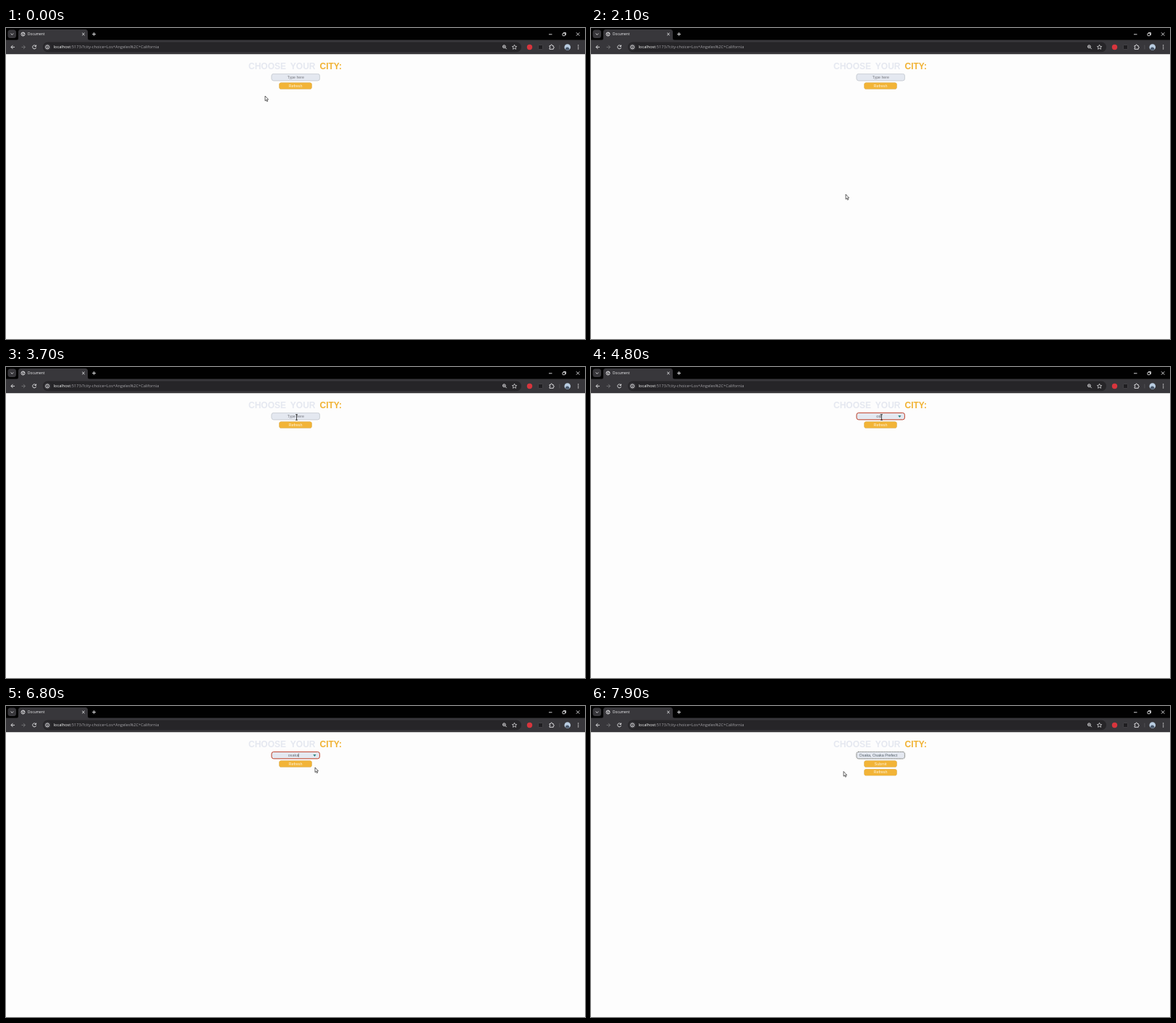
Write an HTML page that moves like this. It is 800 by 430 pixels and loops after 8000 ms.

```html
<!DOCTYPE html>
<html lang="en">
<head>
<meta charset="utf-8">
<title>City picker</title>
<style>
  html, body { margin: 0; width: 100%; height: 100%; overflow: hidden; background: #fdfdfd; }
  svg { display: block; width: 100vw; height: 100vh; }
  text { font-family: "Liberation Sans", Arial, sans-serif; font-size: 5.4px; white-space: pre; }
  .ui { font-family: "Open Sans", "Noto Sans", sans-serif; }
  .line { fill: none; stroke: #e8e8ea; stroke-width: .9; }
  .mid { text-anchor: middle; }
  .button rect { fill: #f2b437; filter: drop-shadow(0 .5px .6px #0004); }
  .button text { fill: #fff3d8; }
</style>
</head>
<body>
<svg viewBox="0 0 800 430" preserveAspectRatio="none">
  <rect width="800" height="430" fill="#fdfdfd"/>

  <!-- Browser chrome -->
  <rect width="800" height="18" fill="#010101"/>
  <rect y="16.5" width="800" height="19.7" fill="#38373b"/>
  <path d="M14 17q3 0 3-3V5.5q0-3.5 3.500-3.500H109.500q3.500 0 3.500 3.500V14q0 3 3 3Z" fill="#38373b"/>
  <rect x="2.500" y="2.500" width="11.500" height="11.500" rx="3.500" fill="#38373b"/>
  <path class="line" d="M6.600 7.600l1.800 1.800 1.800-1.800"/>
  <circle class="line" cx="23.500" cy="8.500" r="2.500" stroke-width=".8"/>
  <path class="line" d="M21.500 7.500l2 1 .3 2M23.500 6l1 1.500 1.500.2"/>
  <text class="ui" x="30" y="10.400" style="font-size:4.800px" fill="#f0f0f2">Document</text>
  <path class="line" d="M105.200 6.800l3.400 3.400m0-3.400l-3.400 3.400M121.600 6v5M119.100 8.500h5"/>
  <path class="line" d="M750 8.800h4.500M788 6.300l4.400 4.400m0-4.400l-4.400 4.400M770.200 6.500h3.300v3.300"/>
  <rect class="line" x="769" y="7.300" width="3.400" height="3.400" rx=".6"/>

  <path class="line" d="M12 26.400H7m2.500-2.600L7 26.400 9.500 29"/>
  <path class="line" d="M21.500 26.400h5m-2.500-2.600l2.500 2.600-2.500 2.600" style="stroke:#777679"/>
  <path class="line" d="M41.300 25a2.500 2.500 0 1 0 .3 2M41.600 23.500v2h-2"/>
  <rect x="51" y="19.500" width="661" height="13.700" rx="6.800" fill="#262528"/>
  <circle cx="57.200" cy="26.400" r="4.700" fill="#38373b"/>
  <circle class="line" cx="57.200" cy="26.400" r="2.500" stroke-width=".7"/>
  <path class="line" d="M57.200 26v1.700M57.200 24.700v.7"/>
  <text class="ui" x="65.700" y="28.400" style="font-size:5.640px" fill="#a5a4a8"><tspan fill="#fff">localhost</tspan>:5173/?city-choice=Los+Angeles%2C+California</text>
  <circle class="line" cx="688.300" cy="25.700" r="1.900"/>
  <path class="line" d="M689.700 27.100l2 2M687.300 25.700h2"/>
  <path class="line" style="stroke-width:.7" d="M702.500 23.200l.9 2.100 2.300.2-1.700 1.500.5 2.300-2-1.200-2 1.200.5-2.300-1.700-1.500 2.300-.2Z"/>
  <circle cx="723.500" cy="26.500" r="3.700" fill="#d7353d"/>
  <rect x="735.500" y="23.500" width="6" height="6" rx="1" fill="#1f1e21" stroke="#5a595d" stroke-width=".5"/>
  <path class="line" d="M751 24.500h1.500q.2-1.500 1.200-1.500t1.200 1.500h1.300v1.400q1.200.2 1.200 1t-1.200 1v1.400H751v-1.600q1-.2 1-.8t-1-.8Z"/>
  <path d="M764.900 23.500v6" stroke="#59585c" stroke-width=".8"/>
  <circle cx="775.800" cy="26.500" r="4.300" fill="#b9cce0"/>
  <path d="M773 29.500q0-3 2.500-3t3 3q-2.700 2.200-5.500 0" fill="#48576b"/>
  <g fill="#eee"><circle cx="790.700" cy="24" r=".7"/><circle cx="790.700" cy="26.400" r=".7"/><circle cx="790.700" cy="28.800" r=".7"/></g>

  <!-- Page -->
  <text x="335" y="57.400" style="font-size:12px;font-weight:bold;word-spacing:2.700px" fill="#e5e8f0">CHOOSE YOUR <tspan fill="#f1b335">CITY:</tspan></text>
  <rect id="field" x="367" y="63.400" width="66.400" height="9.400" rx="2.800" fill="#e4e8f0"/>
  <text id="value" y="69.700"></text>
  <path id="caret" d="M0 65.500v5" stroke="#333" stroke-width=".6"/>
  <path id="arrow" d="M424.300 66.900h4.200l-2.100 3.200Z" fill="#2f8583"/>
  <g class="button" id="submit">
    <rect x="377.400" y="75.500" width="45.200" height="9" rx="2.800"/><text class="mid" x="400" y="81.700">Submit</text>
  </g>
  <g class="button" id="refresh">
    <rect x="377.400" y="75.500" width="45.200" height="9" rx="2.800"/><text class="mid" x="400" y="81.700">Refresh</text>
  </g>

  <path id="pointer" d="M0 0V6.700L1.500 5.300 2.500 7.700 3.600 7.200 2.600 4.900H4.500Z" fill="#fff" stroke="#111" stroke-width=".65"/>
  <path id="beam" d="M-1.500-3.800H1.500M0-3.800V3.800M-1.500 3.800H1.500" fill="none" stroke="#222" stroke-width=".8"/>
</svg>
<script>
const LOOP = 8000, STEP = 100;
const FOCUS = 3800, CHOSEN = 7200;

// Mouse stops: time, x, y
const route = [
  [0, 358, 94], [600, 341, 95], [800, 341, 95], [1000, 337, 94], [1300, 337, 94],
  [1700, 346, 333], [2100, 352, 230], [2200, 352, 230], [3100, 428, 69], [3200, 428, 69],
  [3300, 401.500, 69.500], [6100, 401.500, 69.500], [6800, 427, 85], [7100, 424, 89],
  [7500, 385, 98], [7900, 349, 90.500]
];
// Typed characters of the search word over time
const keyTimes = [4600, 4700, 5000, 5400, 5700];

const $ = id => document.getElementById(id);
const show = (id, visible) => $(id).style.display = visible ? '' : 'none';
const set = (id, attributes) => {
  for (const name in attributes) $(id).setAttribute(name, attributes[name]);
};
const clamp = v => Math.max(0, Math.min(1, v));
const ease = u => u * u * (3 - 2 * u);

function mouseAt(t) {
  const i = Math.max(1, route.findIndex(stop => stop[0] >= t));
  const [t0, x0, y0] = route[i - 1], [t1, x1, y1] = route[i];
  const u = ease(clamp((t - t0) / (t1 - t0)));
  return [x0 + (x1 - x0) * u, y0 + (y1 - y0) * u];
}

function drawField(t) {
  const chosen = t >= CHOSEN, editing = t >= FOCUS && !chosen;
  const typed = 'osaka'.slice(0, keyTimes.filter(k => k <= t).length);
  const text = chosen ? 'Osaka, Osaka Prefect' : typed || 'Type here';
  const mix = clamp((t - FOCUS + STEP) / 300);
  const border = [197, 202, 211].map((c, i) => c + ([196, 70, 48][i] - c) * mix);

  set('field', {
    stroke: chosen ? '#3d4038' : `rgb(${border})`,
    'stroke-width': chosen ? .8 : .7 + .3 * mix,
    'stroke-dasharray': chosen ? '1.200 1' : 'none',
    style: `filter:drop-shadow(0 .6px ${chosen ? 1 : .5}px #0003)`
  });
  $('value').textContent = text;
  set('value', {
    x: chosen ? 370.500 : editing ? 397 : 400.300,
    'text-anchor': chosen ? 'start' : 'middle',
    fill: chosen ? '#56616b' : typed ? '#6b6d75' : '#777980',
    style: `font-size:${typed ? 5.4 : 5.2}px`
  });

  show('arrow', editing);
  show('caret', editing && (t < 5700 || t % 1000 >= 500));
  const caretX = typed ? 397 + $('value').getComputedTextLength() / 2 : 385.500;
  set('caret', { transform: `translate(${caretX})` });
  show('submit', chosen);
  set('refresh', { transform: `translate(0 ${chosen ? 11.700 : 0})` });
}

function draw(t) {
  drawField(t);
  const [x, y] = mouseAt(t);
  const inField = x > 367 && x < 433.400 && y > 63 && y < 73;
  show('beam', inField);
  show('pointer', !inField);
  set(inField ? 'beam' : 'pointer', { transform: `translate(${x} ${y})` });
}

function frame() {
  const t = performance.now() % LOOP;
  draw(Math.floor(t / STEP) * STEP);
  requestAnimationFrame(frame);
}
frame();
</script>
</body>
</html>
```
